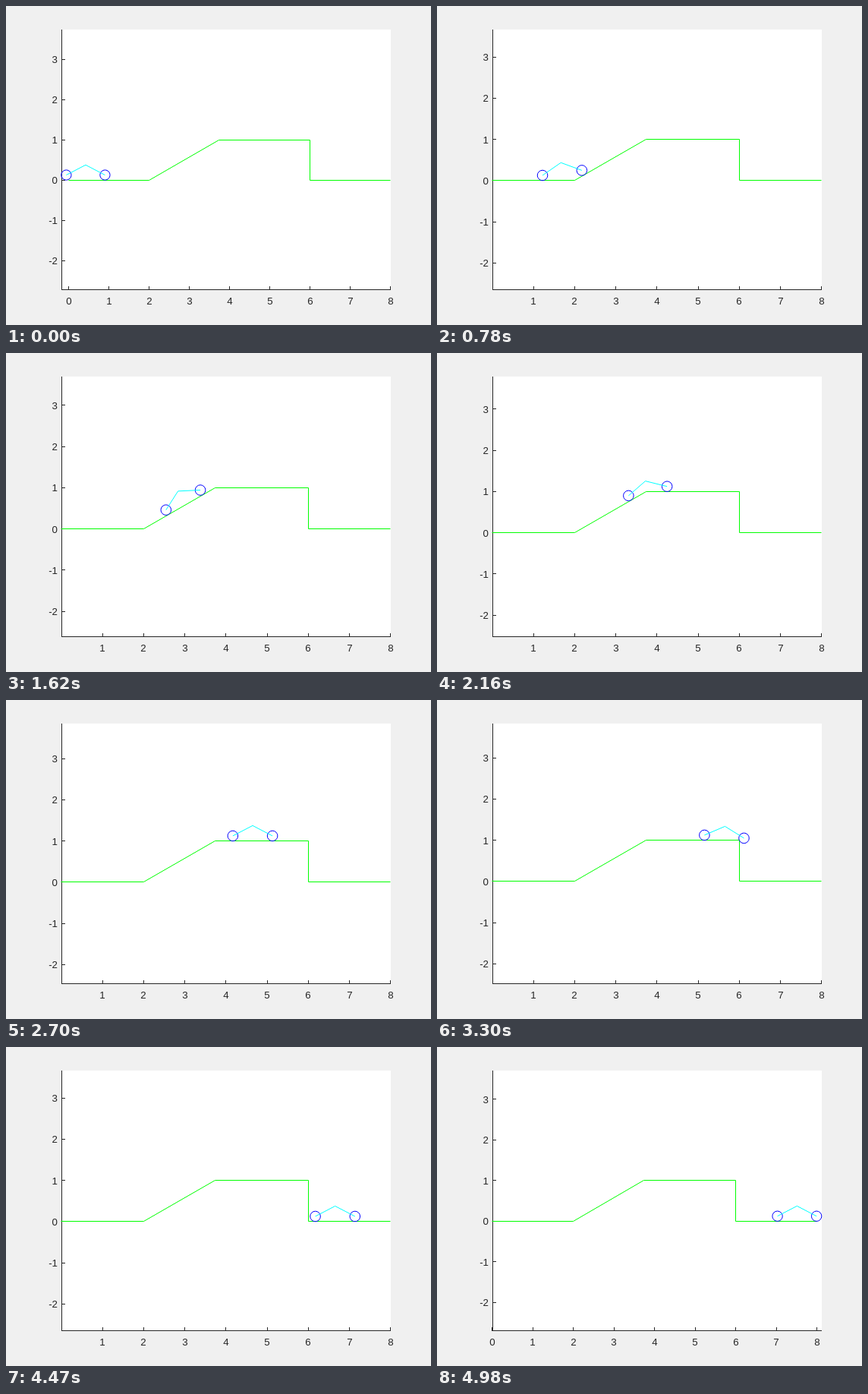
Recreate the animation shown at these times as an HTML page. Size 560 px wide and 420 px high, loop 5.01 s.

```html
<!DOCTYPE html>
<html lang="en">
<head>
<meta charset="utf-8">
<title>Rover on terrain</title>
<style>
  html, body { margin: 0; width: 100%; height: 100%; overflow: hidden; background: #f0f0f0; }
  svg { display: block; }
  text { font: 13.3px "Liberation Sans", Arial, sans-serif; fill: #262626; }
  .axis { stroke: #262626; fill: none; shape-rendering: crispEdges; }
  .plot { fill: none; stroke-width: 1; }
</style>
</head>
<body>
<svg width="560" height="420" viewBox="0 0 560 420">
  <rect width="560" height="420" fill="#f0f0f0"/>
  <rect x="73" y="31" width="434" height="343" fill="#fff"/>
  <path id="axes" class="axis"/>
  <g id="labels"></g>
  <path id="terrain" class="plot" stroke="#0f0"/>
  <circle id="rear" class="plot" stroke="#00f"/>
  <circle id="front" class="plot" stroke="#00f"/>
  <path id="body" class="plot" stroke="#0ff"/>
</svg>
<script>
const FRAME_MS = 30, FRAMES = 167;
const BOX = { left: 72.8, bottom: 373.8, width: 434, height: 342.3 };
const R = 0.125, WHEELBASE = 0.963, APEX = 0.25;
const START = 0.415, STEP = 0.05;
const SLOPE = Math.PI / 6, RAMP_END = 2 + Math.sqrt(3);
const GROUND = [[0, 0], [2, 0], [RAMP_END, 1], [6, 1], [6, 0], [8, 0]];

const el = id => document.getElementById(id);
const snap = v => Math.floor(v) + 0.5;

// Path of a wheel centre: the terrain offset by the wheel radius.
const line = (x, y, angle, length) => ({
  length,
  at: s => [x + s * Math.cos(angle), y + s * Math.sin(angle)]
});
const arc = (x, y, from, sweep) => ({
  length: R * sweep,
  at: s => [x + R * Math.cos(from - s / R), y + R * Math.sin(from - s / R)]
});
const foot = 2 - R * Math.tan(SLOPE / 2);
const crest = RAMP_END - R * Math.sin(SLOPE);
const track = [
  line(0, R, 0, foot),
  line(foot, R, SLOPE, (crest - foot) / Math.cos(SLOPE)),
  arc(RAMP_END, 1, Math.PI / 2 + SLOPE, SLOPE),
  line(RAMP_END, 1 + R, 0, 6 - RAMP_END),
  arc(6, 1, Math.PI / 2, Math.PI / 2),
  line(6 + R, 1, -Math.PI / 2, 1 - R),
  line(6 + R, R, 0, Infinity)
];

function wheelAt(s) {
  for (const piece of track) {
    if (s <= piece.length) return piece.at(s);
    s -= piece.length;
  }
}

// The wheels keep a fixed distance while their mean travel grows evenly.
function wheelsAt(travel) {
  let low = 0.4, high = 0.8, pair;
  for (let i = 0; i < 36; i++) {
    const half = (low + high) / 2;
    pair = [wheelAt(travel - half), wheelAt(travel + half)];
    const [a, b] = pair;
    if (Math.hypot(b[0] - a[0], b[1] - a[1]) < WHEELBASE) low = half;
    else high = half;
  }
  return pair;
}

function addLabel(value, anchor) {
  const node = document.createElementNS("http://www.w3.org/2000/svg", "text");
  node.textContent = value;
  node.setAttribute("text-anchor", anchor);
  el("labels").append(node);
  return { value, node };
}
const xLabels = [0, 1, 2, 3, 4, 5, 6, 7, 8].map(v => addLabel(v, "middle"));
const yLabels = [-2, -1, 0, 1, 2, 3].map(v => addLabel(v, "end"));

function place(node, x, y) {
  node.setAttribute("x", x);
  node.setAttribute("y", y);
}

function draw(frame) {
  const [a, b] = wheelsAt(START + STEP * frame);
  const dx = (b[0] - a[0]) / WHEELBASE, dy = (b[1] - a[1]) / WHEELBASE;
  const top = [(a[0] + b[0]) / 2 - APEX * dy, (a[1] + b[1]) / 2 + APEX * dx];

  // Equal-aspect limits fitted to everything drawn.
  const xMin = Math.min(0, a[0] - R), xMax = Math.max(8, b[0] + R);
  const yMax = Math.max(1, top[1], a[1] + R, b[1] + R);
  const scale = BOX.width / (xMax - xMin);
  const yMin = yMax / 2 - BOX.height / scale / 2;
  const px = x => BOX.left + (x - xMin) * scale;
  const py = y => BOX.bottom - (y - yMin) * scale;
  const path = (points, f = v => v) =>
    "M" + points.map(([x, y]) => f(px(x)) + "," + f(py(y))).join("L");

  let axes = "M73.5,31V374M73,373.5H507";
  for (const { value, node } of xLabels) {
    const x = px(value);
    const shown = value > 0 || xMin < 0 || xMax > 8;
    node.style.display = shown ? "" : "none";
    place(node, Math.round(x), 393);
    if (shown) axes += `M${snap(x)},374v-5`;
  }
  for (const { value, node } of yLabels) {
    const y = py(value);
    place(node, 68, Math.round(y) + 5);
    axes += `M73,${snap(y)}h5`;
  }
  el("axes").setAttribute("d", axes);
  el("terrain").setAttribute("d", path(GROUND, snap));
  el("body").setAttribute("d", path([a, top, b]));
  [["rear", a], ["front", b]].forEach(([id, [x, y]]) => {
    const wheel = el(id);
    wheel.setAttribute("cx", px(x));
    wheel.setAttribute("cy", py(y));
    wheel.setAttribute("r", R * scale);
  });
}

const began = performance.now();
function tick() {
  draw(Math.floor((performance.now() - began) / FRAME_MS) % FRAMES);
  requestAnimationFrame(tick);
}
tick();
</script>
</body>
</html>
```
